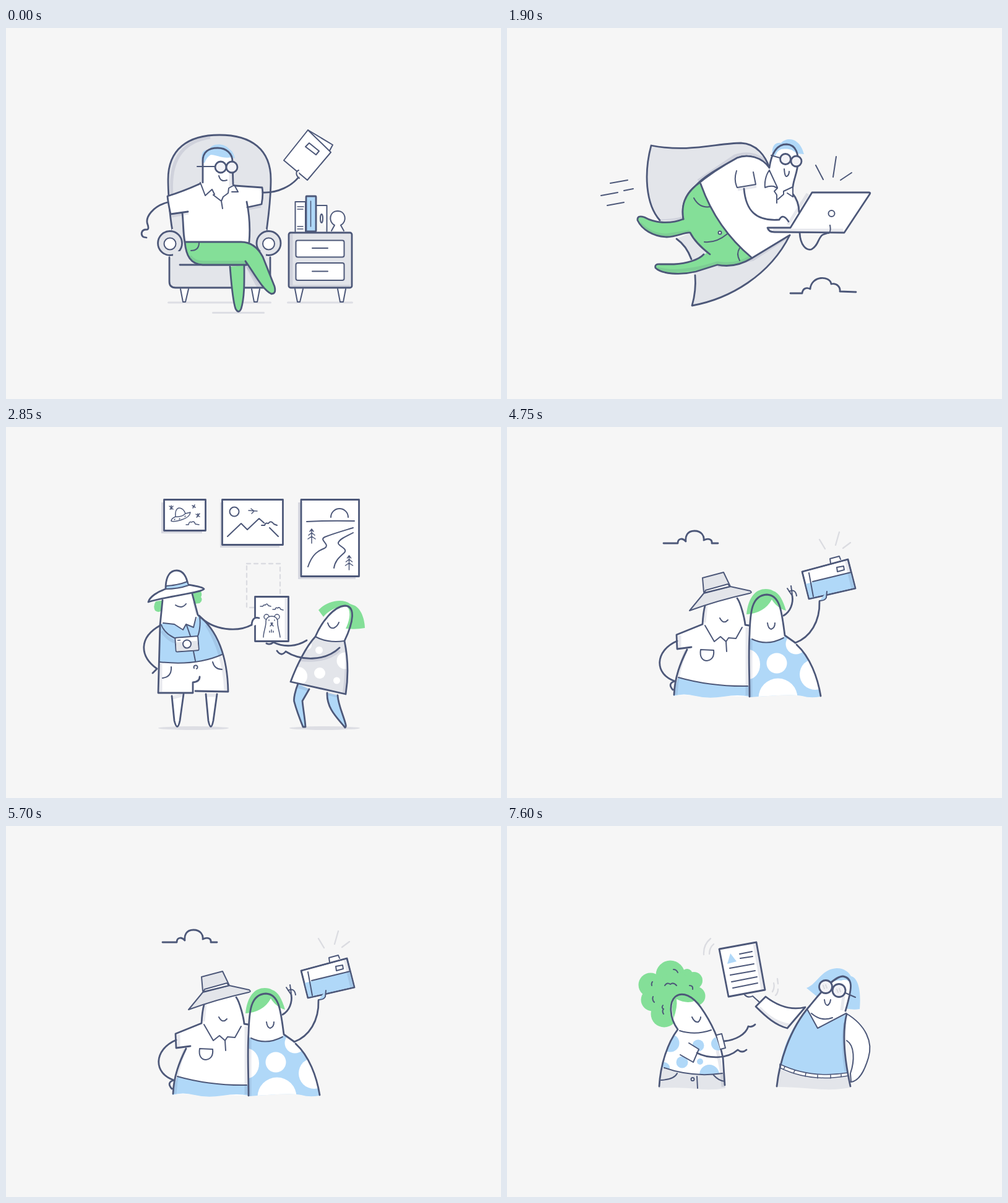
An HTML page that plays this animation: 800 px wide and 600 px high, repeating every 8 s.

```html
<!DOCTYPE html>
<html lang="en">
<head>
<meta charset="utf-8">
<title>Illustration slideshow</title>
<style>
html, body { margin: 0; width: 100%; height: 100%; overflow: hidden; background: #f6f6f6; }
svg { display: block; width: 100%; height: 100%; fill: none; stroke: #4d5879; stroke-width: 2.8; stroke-linecap: round; stroke-linejoin: round; }
.scene { display: none; }
.white { fill: #fff; }
.grey { fill: #e3e5ea; }
.blue { fill: #b0d8f8; }
.green { fill: #84df98; }
.lens { fill: #f3f3f7; }
.ink { fill: #4d5879; }
.flat { stroke: none; }
.thin { stroke-width: 2; }
.fine { stroke-width: 1.5; }
.pale { stroke: #dbdce1; stroke-width: 2.3; }
.shade { stroke: #4d5879; stroke-opacity: .13; stroke-width: 5; stroke-linecap: butt; }
.ground { fill: #dddee4; stroke: none; }
</style>
</head>
<body>
<svg viewBox="0 0 800 600">
<defs>
  <clipPath id="gown"><path d="M500 339C485 355 470 385 460 412L550 432C554 400 551 370 547 346Q520 350 500 339Z"/></clipPath>
  <clipPath id="dress"><path d="M391 341Q425 356 450 338C477 355 500 385 507 436Q490 439 477 435T393 437Z"/></clipPath>
  <clipPath id="jersey"><path d="M432 320Q460 333 496 325C504 350 511 375 513 396L405 397C408 370 416 343 432 320Z"/></clipPath>
  <clipPath id="blouse"><path d="M276 329Q302 339 332 330C343 352 349 375 350 400Q300 407 251 390C256 365 264 346 276 329Z"/></clipPath>
</defs>

<!-- Reader in an armchair -->
<g class="scene">
  <g class="ground">
    <rect x="261" y="442.500" width="168" height="3" rx="1.500"/><rect x="333" y="459" width="85" height="3" rx="1.500"/><rect x="454" y="442.500" width="107" height="3" rx="1.500"/>
  </g>
  <path class="grey" d="M269 328C264 300 262 262 262 245C262 196 294 173 345 173C396 173 428 196 428 245C428 280 424 305 421 328"/>
  <path class="shade" d="M268 270C264 220 280 184 330 177"/>
  <path class="grey flat" d="M268 325H421V385H268Z"/>
  <path class="grey" d="M264 371V410Q264 420 274 420H418Q427 420 427 410V371"/>
  <path class="thin white" d="M282 422L286 443H290L295 422M397 422L401 443H406L410 422"/>
  <circle class="grey" cx="265" cy="348" r="19.500"/><circle class="grey" cx="424.500" cy="348" r="19.500"/>
  <path class="grey flat" d="M270 361H283V378H270ZM406 361H420V378H406Z"/>
  <circle class="white thin" cx="265" cy="349" r="9.500"/><circle class="white thin" cx="424.500" cy="349" r="9.500"/>
  <path d="M281 383H388"/>
  <path class="white flat" d="M261 272L314 251L370 255L414 258Q416 270 413 285L391 290Q396 320 393 347H291Q288 315 285 298L266 301Q262 285 261 272Z"/>
  <path class="shade" d="M268 304L295 299M391 292L412 288M367 384V419M389 384L408 419"/>
  <path d="M313 252C298 259 280 266 261 272C262 283 264 292 266 301L294 297M285 299C287 318 286 333 289 346M370 255L414 258Q416 270 413 285L390 290M389 281C393 300 395 322 393 346"/>
  <path class="green" d="M362 386C364 410 366 440 371 454Q376 463 380 454C386 435 385 405 385 384"/>
  <path class="green" d="M289 346H380C398 346 408 357 415 370L434 418Q437 430 429 430C415 424 400 395 387 377L390 383H318C298 382 291 368 289 346Z"/>
  <path class="shade" d="M297 369Q305 380 322 379H386M415 420L391 386"/>
  <path class="thin" d="M312 347Q312 360 299 360"/>
  <path class="white flat" d="M318 252V215C318 200 328 194 342 194S366 203 366 216L367 253L350 290L320 268Z"/>
  <path class="blue flat" d="M317 218C314 203 318 196 328 197C332 186 352 185 361 196C368 200 369 208 370 211L365 209C350 212 340 205 331 205Q324 209 321 218Z"/>
  <path d="M318 250V215C318 200 328 194 342 194S366 203 366 216L367 253"/>
  <path class="shade" d="M363 233V258"/>
  <path class="white thin" d="M314 250L322 271L333 261L337 269L335 270L348 280L351 273L359 267L360 259L369 254L375 265L365 265M348 280L350 292"/>
  <circle class="lens" cx="347" cy="225" r="9"/><circle class="lens" cx="365" cy="225" r="9"/>
  <path class="thin" d="M309 224H338M344 239Q347 250 357 246"/>
  <path d="M261 282C238 288 224 306 229 318Q232 327 226 326C219 326 217 334 222 338L227 339M415 266C440 267 462 255 473 241"/>
  <path class="white thin" d="M488 165L528 189L520 204Z"/>
  <path class="white thin" d="M449 214L488 165L525 201L487 246Z"/>
  <path class="thin" d="M490 186L506 199L501 205L484 192Z"/>
  <path class="white thin" d="M474 243C468 238 468 232 473 230"/>
  <rect class="grey" x="457" y="331" width="102" height="89" rx="3"/>
  <path class="shade" d="M461 333V418H556"/>
  <rect class="white thin" x="468.500" y="343.500" width="78" height="27" rx="3"/><rect class="white thin" x="468.500" y="380" width="78" height="28" rx="3"/>
  <path class="thin" d="M495 356H520M495 393.500H520"/>
  <path class="white thin" d="M467 422L471 443H475L480 422M536 422L540 443H545L549 422"/>
  <path class="white thin" d="M467.500 329V281H484V329"/><path class="white thin" d="M502 287H518.500V329"/>
  <rect class="blue" x="485" y="272" width="16" height="57" rx="1"/>
  <path class="fine" d="M471 289H481M471 293H480M471 321H480M471 325H480M492.500 280V321"/>
  <ellipse class="thin" cx="510" cy="308" rx="2" ry="7"/>
  <path class="white thin" d="M526 328L531 319C520 313 523 296 536 296S552 313 541 319L546 328"/>
</g>

<!-- Flying with a laptop -->
<g class="scene">
  <path class="grey" d="M247 311C224 285 221 235 233 190C295 202 340 186 378 186C404 187 418 208 424 226C412 209 388 203 372 210C340 228 318 240 305 255C286 270 282 290 285 310"/>
  <path class="grey flat" d="M274 341C290 355 297 370 301 395C306 415 303 432 299 448C360 438 425 400 457 335L395 371L340 380L297 331Z"/>
  <path d="M274 341Q290 352 298 374M304 400Q306 425 299 449C360 438 425 400 457 335"/>
  <path class="shade" d="M284 307Q275 311 248 312M422 219C405 203 388 200 368 207L309 247M341 385L398 374L450 340"/>
  <path class="green flat" d="M313 250C290 262 278 285 285 309C262 318 238 315 222 306Q210 302 211 311C218 326 236 337 258 338C275 338 286 330 296 331C303 345 315 355 324 362C312 375 290 381 270 382H248Q238 381 240 388C250 398 280 400 305 394L340 383C360 387 380 382 396 372Z"/>
  <path class="shade" d="M215 316Q233 335 258 335L295 329M243 389Q280 399 340 380Q370 385 392 371"/>
  <path d="M285 309C262 318 238 315 222 306Q210 302 211 311C218 326 236 337 258 338C275 338 286 330 296 331C303 345 315 356 328 366M318 366C310 375 290 381 270 382H248Q238 381 240 388C250 398 280 400 305 394L340 383C360 387 380 382 396 372"/>
  <path class="white flat" d="M313 251C335 232 358 216 372 210C392 204 412 209 424 226L440 256L458 268C470 285 473 300 472 322L457 335L396 372C350 335 325 290 313 251Z"/>
  <path d="M285 309C281 286 288 270 305 255C325 238 350 222 372 210C390 203 412 209 424 226M313 252C328 295 352 335 395 371M461 267Q472 280 472 298M457 335L396 372"/>
  <path class="thin" d="M302 275Q311 292 329 289M319 346Q338 348 356 333M376 356Q370 365 376 376"/>
  <circle class="white thin" cx="344" cy="331" r="2.500"/>
  <path class="shade" d="M373 261L403 256"/>
  <path class="thin" d="M371 231C368 240 368 250 372 258L402 253L398 233"/>
  <path d="M383 260C386 295 402 313 440 310Q446 299 455 313"/>
  <path class="white flat" d="M424 228C427 205 434 188 452 188C468 189 471 205 470 218C470 232 463 245 461 258L437 283Z"/>
  <path class="blue flat" d="M429 206C427 190 434 184 443 186C450 178 462 179 468 184C476 190 478 198 480 204L468 203C458 193 448 196 443 196Q437 198 434 206Z"/>
  <path d="M424 226C427 205 434 188 452 188C468 189 471 205 470 218C470 232 463 245 462 257"/>
  <path class="white thin" d="M424 230C418 238 416 250 417 258Q424 255 431 256L437 259L432 264L436 270L436 283M424 230L437 258M438 277L447 269L447 264L462 257L462 273L453 267"/>
  <circle class="lens" cx="450" cy="212" r="8.500"/><circle class="lens" cx="467.500" cy="215.500" r="8.500"/>
  <path class="thin" d="M427 206L441 210M448 228Q449 241 452 240Q456 238 456 232"/>
  <path d="M473 331C474 352 484 360 492 358C504 352 503 337 511 334L520 331"/>
  <path class="shade" d="M454 318L486 268"/>
  <path class="white" d="M421 323H458L493 266H585Q588 266 586 269L545 331L432 330Q423 330 421 323Z"/>
  <path class="shade" d="M430 327H543"/>
  <circle class="thin" cx="524.500" cy="300" r="5"/>
  <path class="thin" d="M520 332Q524 329 522 319M499 222L511 245M532 208L527 241M539 246L557 234M167 251L195 246M152 271L179 266M189 263L204 260M162 287L189 282"/>
  <path d="M458 429H477C478 421 484 419 490 422C492 400 522 400 524 414C534 412 539 420 538 426L564 427"/>
</g>

<!-- Hanging pictures -->
<g class="scene">
  <path class="flat" style="fill:#d7d8e0" d="M251 122H317V172H251ZM346 122H442V195H346ZM472 122H565V246H472Z"/>
  <path class="white" d="M255.500 117.500H322.500V167.500H255.500ZM349.500 117.500H447.500V190.500H349.500ZM477 117.500H570.500V241.500H477Z"/>
  <path class="fine" d="M267 152Q267 148 274 145C273 136 276 130 281 131Q287 132 290 140L298 138Q297 146 284 150Q271 154 267 152ZM274 145Q284 146 290 140M272 150L273 149M280 149L281 148M289 145L290 144M264 128L270 133M270 128L265 133M267 127V133M301 127L306 130M305 126L302 131M307 141L313 145M313 140L308 146M310 140V145M291 158H295Q296 152 300 154Q304 151 306 157L312 158M392 135L406 136M396 132L401 136L397 140"/>
  <path class="thin" d="M358 177L380 156L390 166L409 148L417 155M426 163L440 177M413 159H418Q419 154 424 156Q428 150 433 157L438 159M525 146A14 14 0 0 1 553 146M486 153Q520 151 563 152M488 226C495 205 505 200 515 196C525 190 505 183 515 178C530 172 548 167 561 163M530 228C532 215 540 210 547 203C553 196 535 192 537 187C540 180 552 176 561 171"/>
  <circle class="thin" cx="369" cy="137" r="7.500"/>
  <path id="tree" class="fine" d="M494 165V188M491 169L494 165L497 169M489 175L494 171L499 175M488 181L494 177L500 181"/>
  <use href="#tree" x="60.500" y="43"/>
  <path class="pale" stroke-dasharray="6 6" d="M389 221H443V292H389Z"/>
  <ellipse class="ground" cx="303" cy="487" rx="57" ry="3"/><ellipse class="ground" cx="515" cy="487" rx="57" ry="3"/>
  <path class="white" d="M268 435L272 475Q277 494 281 475L287 432M323 432L327 475Q331 494 335 475L341 432"/>
  <path class="shade" d="M269 438L287 433M323 434H341"/>
  <path class="green flat" d="M242 282Q237 290 241 297Q247 301 251 297L256 280ZM301 267L314 264Q318 270 315 275Q319 280 313 285L304 286Z"/>
  <path class="white flat" d="M253 278L250 318L246 430H302L304 428L359 428C358 372 342 328 310 304L301 268Z"/>
  <path class="blue flat" d="M250 318L247 381C285 384 320 380 350 367C344 345 330 318 311 304L303 323L291 319L285 329L272 318Z"/>
  <path class="shade" d="M250 383V428M324 320Q352 365 355 426M252 330Q262 345 275 348M304 283L309 303"/>
  <path d="M253 280L249 320L246 430H302V413Q313 412 313 404M301 270L310 304C342 328 358 372 359 428L306 427"/>
  <path class="thin" d="M248 380C285 384 320 381 349 368M267 388Q268 404 253 406M334 380Q337 392 349 392M304 390A3 3 0 1 1 308 391M292 321L298 338M303 363L306 378M251 320C256 333 266 338 274 342M313 307C315 320 312 335 309 340M274 288Q284 295 291 286"/>
  <path class="white thin" d="M254 317L272 319L286 328L291 319L303 324L307 308"/>
  <g transform="rotate(-4 292 351)">
    <rect class="white thin" x="274" y="339.500" width="37" height="23" rx="2"/>
    <path class="grey flat" d="M275 347H310V361H275Z"/><path class="fine" d="M278 344H282"/>
    <circle class="white thin" cx="292.500" cy="351" r="6.500"/>
  </g>
  <path class="white" d="M230 283C232 275 245 266 258 262C258 240 266 232 276 232S292 242 294 255C308 257 318 259 320 262C316 268 262 273 230 283Z"/>
  <path class="blue thin" d="M259 257Q278 256 293 250L295 256Q278 262 258 262Z"/>
  <path d="M249 321C215 340 215 370 244 391L237 398M312 305C335 330 375 332 397 320"/>
  <path class="white" d="M402.500 274.500H456.500V346.500H402.500Z"/>
  <path class="shade" d="M453 276V344"/>
  <path class="white flat" d="M399 322L398 312L409 307V318Z"/>
  <path d="M397 320Q398 306 409 309"/>
  <circle class="fine" cx="421" cy="307" r="4"/><circle class="fine" cx="438" cy="307" r="4"/>
  <path class="white fine" d="M416 340C416 330 421 322 420 313Q422 306 429.500 306Q437 306 439 313C438 322 442 330 443 340"/>
  <path class="fine" d="M411 290H415Q416 287 419 288Q422 284 424 289L428 290M431 295H435Q436 291 439 293Q442 290 444 295L448 296M425 312V313M434 312V313M428 317H431L429.500 319ZM427 322L429.500 319L432 322M426 330V332M429 328V332M432 330V332"/>
  <path class="blue" d="M472 415C468 425 464 440 466 445C470 460 476 475 480 485L484 485C483 470 480 455 479 443L490 424M519 430C518 455 535 470 548 486Q550 485 549 481C545 465 537 450 536 434"/>
  <path class="shade" d="M472 420L490 425M519 431L536 435"/>
  <path class="white flat" d="M498 341C510 315 530 290 548 289C565 290 562 315 547 346Q520 350 498 341Z"/>
  <path class="green flat" d="M505 296C520 280 545 277 556 286L564 289C576 296 580 315 580 325Q565 328 549 326C557 310 558 292 548 289C532 291 520 298 513 307Z"/>
  <g clip-path="url(#gown)" class="flat">
    <path class="grey" d="M450 330H560V440H450Z"/>
    <g class="white"><circle cx="506" cy="361" r="6"/><circle cx="548" cy="378" r="13.500"/><circle cx="507" cy="398" r="9"/><circle cx="534.500" cy="410" r="5.500"/><circle cx="472" cy="403" r="15"/><circle cx="487" cy="353" r="7"/></g>
    <path class="shade" d="M549 346Q553 390 546 432M539 361Q515 382 472 376"/>
  </g>
  <path d="M500 339C510 315 530 290 548 289C565 290 562 315 547 346C552 370 554 400 549 432L460 412C470 385 485 355 500 339"/>
  <path class="thin" d="M500 339Q520 350 547 346M520 317Q523 327 530 325Q536 322 538 316"/>
  <path d="M539 357C515 380 475 378 452 363Q445 372 438 362M486 345C470 355 450 357 432 348Q427 353 421 350"/>
</g>

<!-- Selfie -->
<g class="scene">
  <path d="M253 188H276C276 181 283 178 289 185C288 177 291 168 303 168S319 177 318 183C326 179 332 182 331 188H341"/>
  <path class="white flat" d="M319 287L316 319L274 336L275 359L291 358C282 380 272 400 270 433L391 436V321L385 320C384 305 378 285 372 275Z"/>
  <path class="blue flat" d="M277 405Q330 420 391 419V436Q375 432 350 436T305 435T269 435Q271 418 277 405Z"/>
  <path class="shade" d="M322 287L319 316M279 337V357M289 362Q275 395 273 433M388 324V434"/>
  <path d="M320 289Q317 300 316 319L274 336L275 359L298 356M291 360C280 382 271 405 270 433M372 277C378 285 384 310 385 320L391 321M275 346C238 362 238 400 271 411Q259 415 268 425"/>
  <path class="thin" d="M344 309Q350 320 357 312M320 321L335 347L345 339L354 347L355 363M354 347L358 341L370 342L380 324M313 360C311 372 316 378 323 378C332 377 335 370 334 361ZM277 405Q330 420 389 419"/>
  <path class="grey thin" d="M318 267L316 244L350 235L361 258L393 265Q397 268 392 269C365 275 325 286 295 297L318 269L361 258"/>
  <path class="white thin" d="M321 264L357 254L360 258L319 268Z"/>
  <path class="white flat" d="M391 436V335C393 300 395 271 420 271C442 272 444 300 449 337V350H391Z"/>
  <path class="green flat" d="M387 303C390 275 402 262 418 262Q426 262 430 265C440 268 446 280 451 297C440 294 432 286 428 279C420 294 405 302 387 303Z"/>
  <g clip-path="url(#dress)" class="flat">
    <path class="blue" d="M390 330H510V440H390Z"/>
    <g class="white"><circle cx="436" cy="382" r="16.500"/><circle cx="438" cy="438" r="31.500"/><ellipse cx="390" cy="384" rx="19" ry="24"/><circle cx="467" cy="351" r="16.500"/><circle cx="498" cy="400" r="25"/></g>
    <path class="shade" d="M394 340V438"/>
  </g>
  <path d="M392 436C392 400 390 370 392 335C393 300 395 272 420 271C442 272 444 300 449 337L466 349M468 352C490 372 502 405 507 435"/>
  <path class="thin" d="M396 343Q420 355 447 341M421 317Q422 326 427 327Q433 325 433 317"/>
  <path d="M447 305C458 299 463 285 461 273M466 349C490 340 506 315 505 282"/>
  <path class="thin" d="M461 273L453 261M461 271L459 257M456 266Q466 261 468 273"/>
  <path class="white thin" d="M523 220L522 213L537 209L539 214"/>
  <path class="white" d="M477 234L551 214L563 261L488 278Z"/>
  <path class="blue flat" d="M482 254L556 235L562 260L489 277Z"/>
  <path class="shade" d="M548 216L559 261"/>
  <path class="thin" d="M477 234L551 214L563 261L488 278ZM488 236L495 274M494 250L556 235M533 227L544 225L545 231L534 234Z"/>
  <path class="blue thin" d="M505 281Q514 281 516 276L517 266"/>
  <path class="pale" d="M505 182L514 197M537 170L531 191M543 196L555 187"/>
</g>

<!-- Detective and dog -->
<g class="scene">
  <path d="M224 222H246C247 214 255 211 262 215C262 192 298 192 295 210C308 202 318 208 315 220H344"/>
  <path class="blue flat" d="M410 190Q420 183 447 180Q461 177 462 190Q459 208 461 215L458 250L453 272L420 280Q414 265 414 238Q408 210 410 190Z"/>
  <path class="white flat" d="M402 428C404 385 415 345 432 320C420 308 418 285 424 270C432 254 450 253 465 267C485 285 492 310 498 333C508 360 514 390 516 427Z"/>
  <path class="blue flat" d="M421 281Q420 256 442 257Q453 257 458 263Q440 276 421 281Z"/>
  <path class="grey flat" d="M403 405L514 404L516 427Q490 431 470 427T402 429Z"/>
  <g clip-path="url(#jersey)">
    <path style="stroke:#b0d8f8;stroke-width:8" d="M400 334Q460 341 520 333M400 348Q460 356 520 347M400 362Q460 370 520 361M400 376Q460 384 520 375M400 390Q460 397 520 389"/>
  </g>
  <path class="shade" d="M491 315L500 345L511 425"/>
  <path d="M402 428C404 385 415 345 432 320C420 308 418 285 424 270C432 254 450 253 465 267C485 285 492 310 498 333C508 360 514 390 516 427M425 328C395 308 355 295 327 312L320 308M492 333C525 328 552 310 563 287"/>
  <path class="thin" d="M424 280Q438 277 452 264M426 285Q443 281 457 268M443 300Q446 309 450 307Q456 304 454 293M436 321Q460 333 492 325M492 332C488 345 490 360 504 373M404 397H427M478 397L513 396M406 405H427M478 405L511 404"/>
  <path class="shade" d="M426 416Q427 420 432 420H474Q480 420 480 413V395"/>
  <rect class="white thin" x="426.500" y="389.500" width="50" height="27" rx="5"/>
  <path class="thin" d="M431 395L449 405L466 395M470.500 394V411"/>
  <g transform="rotate(-37 533 243.500)"><rect class="white thin" x="529" y="270" width="8" height="43" rx="4"/></g>
  <circle class="white" cx="533" cy="243.500" r="27"/><circle class="lens thin" cx="533" cy="243.500" r="19.500"/>
  <path class="shade" d="M537 227A17 17 0 0 1 541 258"/>
  <path class="fine" d="M531 237L539 242M527 241L539 247"/>
  <path class="thin" d="M563 287Q570 276 564 268"/>
  <path class="pale" d="M538 196Q560 196 573 214M541 206Q553 206 561 217M293 294Q303 284 321 287M300 300Q307 293 317 296"/>
  <path class="white flat" d="M271 426C272 395 280 365 290 348L300 314C312 309 325 311 335 320C350 335 356 355 356 367L346 377L336 400L338 426Q300 430 271 426Z"/>
  <path class="shade" d="M306 360L314 407L337 402M334 403V426"/>
  <path d="M271 426C272 395 280 365 290 348M337 401L338 426M302 313Q320 308 335 320M345 330Q356 350 356 367"/>
  <path class="white thin" d="M311 352L304 359L315 404L381 388L370 343L351 348C356 356 356 363 355 368C345 380 322 370 311 352Z"/>
  <path d="M310 352C318 364 330 374 347 377"/>
  <path class="ink thin" d="M345 374Q345 364 355 365Q357 376 349 377Z"/>
  <path class="white" d="M302 314C285 316 275 332 275 342C277 350 290 346 296 338Q302 331 301 325"/>
  <path class="ink fine" d="M313 326L351 319Q352 328 344 331Q336 332 333 327Q330 335 322 335Q314 334 313 326Z"/>
  <path class="thin" d="M289 385C287 400 288 415 294 416C300 415 300 400 299 387"/>
</g>

<!-- Handing over a document -->
<g class="scene">
  <g class="green flat">
    <circle cx="232" cy="257" r="19.500"/><circle cx="264" cy="241" r="23.500"/><circle cx="291" cy="240" r="9"/><circle cx="302" cy="250" r="14"/><circle cx="305" cy="275" r="15.500"/><circle cx="235" cy="281" r="18.500"/><circle cx="254" cy="304" r="21.500"/><circle cx="272" cy="271" r="34"/>
  </g>
  <path class="thin" d="M269 232Q274 232 276 237M255 258Q259 252 264 256Q269 252 274 258M235 252Q233 254 234 258M295 258Q301 258 300 264M236 276Q234 281 238 285M252 290Q249 294 253 296Q250 299 253 304"/>
  <path class="white flat" d="M246 422C248 385 260 350 276 329C262 310 262 285 272 276C284 267 300 275 313 293C330 317 343 345 349 375L352 422Z"/>
  <path class="green flat" d="M267 298Q266 272 285 273Q296 276 303 283Q290 288 274 280Q276 292 269 312Z"/>
  <path class="grey flat" d="M251 391Q300 407 350 400L353 424Q330 428 305 425T245 424Z"/>
  <g clip-path="url(#blouse)" class="blue flat">
    <circle cx="264" cy="351" r="14.500"/><circle cx="309" cy="355" r="9.500"/><circle cx="341" cy="352" r="11"/><circle cx="283" cy="382" r="9.500"/><circle cx="312" cy="381" r="5"/><circle cx="327" cy="402" r="16"/><circle cx="254" cy="391" r="9"/>
  </g>
  <path class="shade" d="M340 363L347 400L349 422"/>
  <path d="M246 421C248 385 260 350 276 329C262 310 262 285 272 276C284 267 300 275 313 293C330 317 343 345 349 375L352 419"/>
  <path class="thin" d="M299 309Q303 318 309 317Q313 313 313 309M279 331Q304 339 330 330M254 391Q300 407 348 400M307 405L308 424M249 411Q270 410 275 400M334 403Q342 412 352 413"/>
  <circle class="white thin" cx="300" cy="409.500" r="2.500"/>
  <path class="white thin" d="M294 351L310 361L301 382L280 370M339 338L347 336L353 359L345 361"/>
  <path d="M307 367C325 376 355 378 373 362Q380 368 387 362M351 348C370 346 386 337 390 324Q396 326 401 321"/>
  <path class="white" d="M343 199L403 188L417 265L358 276Z"/>
  <path class="shade" d="M400 191L413 264"/>
  <path class="blue flat" d="M361 206L371 219L356 223Z"/>
  <path class="thin" d="M376 207L396 203M377 214L397 211M360 230L399 223M361 241L401 234M363 252L404 244M365 262L405 254M384 273Q390 279 397 275L408 285"/>
  <path class="pale" d="M318 208Q317 192 329 182M327 207Q327 197 334 191M437 247L438 255M431 254Q433 262 429 268M438 264Q438 270 434 274"/>
  <path class="blue flat" d="M484 262C502 255 508 231 533 230C545 230 552 236 556 243C570 246 572 275 570 296Q560 298 547 295L500 275Z"/>
  <path class="white" d="M418 276C440 293 462 298 482 293L453 327C434 322 420 310 402 292Z"/>
  <path class="shade" d="M408 294Q430 318 456 322"/>
  <path class="white thin" d="M548 303C580 322 592 350 584 375C578 395 570 412 556 414L555 400C562 380 562 355 549 347"/>
  <path class="white flat" d="M436 421C440 385 455 330 490 290C510 265 530 243 543 243C560 246 558 262 547 299C542 335 548 375 555 421Z"/>
  <path class="blue flat" d="M515 259Q535 241 547 243Q555 246 556 256Q551 246 540 250Q530 247 515 259Z"/>
  <path class="blue flat" d="M485 296C460 325 447 355 442 385Q490 409 551 400C545 370 542 340 549 304L502 327Z"/>
  <path class="grey flat" d="M438 392Q490 415 554 404L555 423Q530 428 495 425T435 422Z"/>
  <path class="white fine" d="M441 385Q490 409 551 399L551 404Q490 415 441 391ZM449 389L447 394M465 395L463 400M483 400L482 405M502 402V408M523 403V408M540 401V406"/>
  <path class="shade" d="M544 275L541 298M546 318Q541 355 548 397"/>
  <path d="M436 421C440 385 455 330 490 290C510 265 530 243 543 243C560 246 558 262 547 299M549 304C541 335 545 375 555 421"/>
  <path class="thin" d="M485 296L502 327L548 303M492 303Q508 317 526 310M513 281Q514 290 518 290Q522 288 523 281M547 270L563 277"/>
  <circle class="lens" cx="515" cy="260" r="10.500"/><circle class="lens" cx="536.500" cy="266" r="10.500"/>
  <path class="pale fine" d="M511 258L513 263M515 257L517 262M533 264L535 269M537 263L539 268"/>
</g>
</svg>
<script>
const scenes = document.querySelectorAll(".scene");
const starts = [0, 950, 2850, 4750, 6650, 7600];
const loop = 8000;

function draw() {
  const time = performance.now() % loop;
  const current = starts.findLastIndex(start => time >= start);
  scenes.forEach((scene, i) => scene.style.display = i === current ? "inline" : "none");
  requestAnimationFrame(draw);
}
draw();
</script>
</body>
</html>
```
